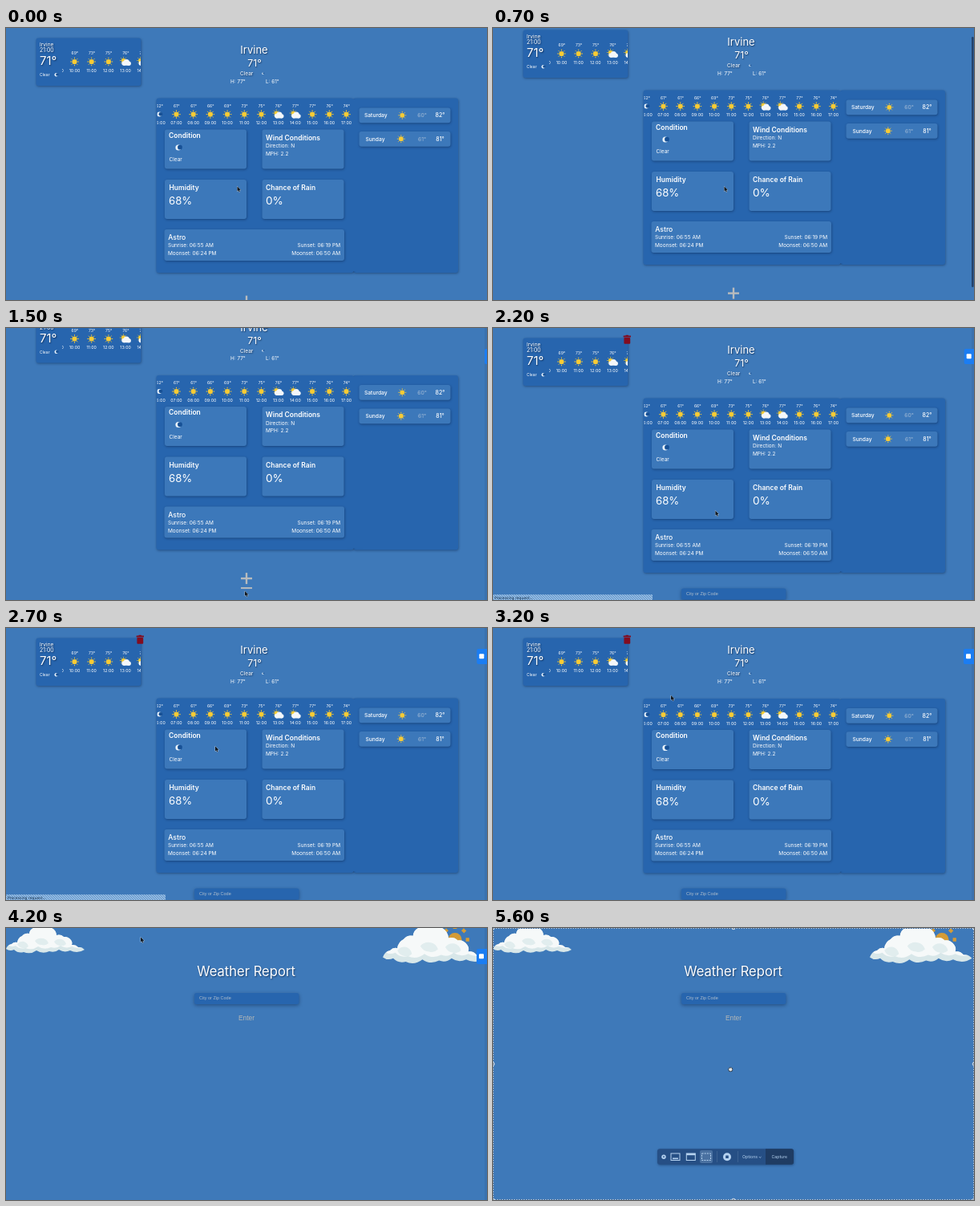
Write an HTML page with a canvas that moves like this. It is 600 px wide and 339 px high and loops after 5700 ms.

```html
<!DOCTYPE html>
<html lang="en">
<head>
<meta charset="utf-8">
<title>Weather Report</title>
<style>
html, body { margin: 0; width: 100%; height: 100%; overflow: hidden; background: #3e79b9; }
canvas { display: block; width: 600px; height: 339px; }
</style>
</head>
<body>
<canvas id="stage" width="600" height="339"></canvas>
<script>
const ctx = document.getElementById('stage').getContext('2d');
const LOOP = 5700, STEP = 100;
const SKY = '#3e79b9', PANEL = '#2765ae', CARD = '#3c78ba';
const UI = 'Inter, sans-serif', ARIAL = '"Liberation Sans", Arial, sans-serif';

// Tracks: [time, value, ...], linear between keys
const scrollTrack = [[400, 0], [700, 10], [1000, 28.5], [1700, 28.5], [2000, 0]];
const tabTrack = [[1200, 600], [1500, 597], [1800, 588], [3100, 587], [4600, 587], [4900, 600]];
const cursorTrack = [[1000, 288.5, 197.5], [1500, 298, 328], [1700, 298, 328], [2600, 261, 147.5],
  [2700, 261, 147.5], [3200, 222, 84], [4000, 168, 11.5], [4600, 168, 11.5], [5100, 296, 174]];

function at(track, t) {
  const next = track.findIndex(key => key[0] > t);
  if (next === 0) return track[0].slice(1);
  if (next < 0) return track[track.length - 1].slice(1);
  const a = track[next - 1], b = track[next], k = (t - a[0]) / (b[0] - a[0]);
  return a.slice(1).map((v, i) => v + (b[i + 1] - v) * k);
}

function shadow(alpha, x = 0, y = 0, blur = 0) {
  ctx.shadowColor = `rgba(0,20,50,${alpha})`;
  ctx.shadowOffsetX = x;
  ctx.shadowOffsetY = y;
  ctx.shadowBlur = blur;
}

function box(x, y, w, h, fill, r = 0) {
  ctx.fillStyle = fill;
  ctx.beginPath();
  ctx.roundRect(x, y, w, h, r);
  ctx.fill();
}

function raised(x, y, w, h, fill = CARD) {
  shadow(.4, .5, 1, 3);
  box(x, y, w, h, fill, 3);
  shadow(0);
}

function oval(x, y, rx, ry, fill) {
  ctx.fillStyle = fill;
  ctx.beginPath();
  ctx.ellipse(x, y, rx, ry, 0, 0, Math.PI * 2);
  ctx.fill();
}

function text(s, x, y, size, { weight = 400, align = 'left', color = '#fff', family = UI } = {}) {
  ctx.font = `${weight} ${size}px ${family}`;
  ctx.textAlign = align;
  ctx.fillStyle = color;
  ctx.fillText(s, x, y);
}

function heading(s, x, y, size, options) {
  shadow(.6, .8, 1, 1.5);
  text(s, x, y, size, options);
  shadow(0);
}

function clipped(x, y, w, h, draw) {
  ctx.save();
  ctx.beginPath();
  ctx.rect(x, y, w, h);
  ctx.clip();
  draw();
  ctx.restore();
}

function sun(x, y, r = 3.1, color = '#f8cb35', reach = 1.7, rayWidth = .32) {
  ctx.strokeStyle = color;
  ctx.lineWidth = r * rayWidth;
  ctx.beginPath();
  for (let i = 0; i < 8; i++) {
    const c = Math.cos(i * Math.PI / 4) * r, s = Math.sin(i * Math.PI / 4) * r;
    ctx.moveTo(x + c * (reach - .5), y + s * (reach - .5));
    ctx.lineTo(x + c * reach, y + s * reach);
  }
  ctx.stroke();
  oval(x, y, r, r, color);
}

function cloudySun(x, y) {
  sun(x - 2.5, y - 1.5, 2.7);
  for (const [dx, dy, r] of [[-2, 2, 2.8], [1.2, .5, 3.6], [4.2, 2.2, 2.6]]) oval(x + dx, y + dy, r, r, '#f4f7fa');
  box(x - 3, y + 2, 8, 2.8, '#f4f7fa', 1);
}

function moon(x, y, r) {
  oval(x, y, r, r, '#e9f3fb');
  oval(x + r * .55, y - r * .1, r * .8, r * .8, '#175196');
}

const hourly = [62, 61, 61, 66, 69, 73, 75, 76, 77, 77, 76, 74].map((temp, i) => ({ temp, hour: i + 6 }));

function hourStrip(x, y, hours) {
  hours.forEach(({ temp, hour }, i) => {
    const cx = x + i * 21.2;
    text(temp + '°', cx + .3, y - 8.8, 5.1, { align: 'center' });
    if (hour === 6) moon(cx, y, 3);
    else if (hour === 13 || hour === 14) cloudySun(cx, y);
    else sun(cx, y);
    text(String(hour).padStart(2, '0') + ':00', cx, y + 12.6, 5.3, { align: 'center' });
  });
}

function savedCity() {
  raised(37.5, 12.5, 131, 59.5, PANEL);
  heading('Irvine', 42, 23.2, 6.6);
  heading('21:00', 42, 30, 6.9);
  heading('71°', 42, 46, 15);
  text('Clear', 42, 60, 5);
  moon(62.7, 58.3, 2.2);
  clipped(70, 20, 98, 45, () => hourStrip(64.3, 42, hourly.slice(3, 9)));
}

function cityHeader() {
  heading('Irvine', 309.5, 32.3, 13, { align: 'center' });
  heading('71°', 310, 48.2, 12.3, { align: 'center' });
  heading('Clear', 292, 59, 6.5);
  moon(320.6, 56.7, 1.3);
  text('H: 77°', 280, 68.7, 6.4);
  text('L: 61°', 324, 68.7, 6.4);
}

function dayRow(y, name, nameX, sunX, low, high) {
  raised(440.5, y - 9.3, 114, 18.8);
  text(name, nameX, y + 2.4, 6.7, { weight: 500 });
  sun(sunX, y, 2.9);
  text(low, 519, y + 2.5, 6.8, { align: 'center', color: '#a3bbd6' });
  text(high, 541.5, y + 2.5, 7, { align: 'center', weight: 500 });
}

function details() {
  raised(433, 87.5, 131, 217.5, PANEL);
  raised(187.5, 87.5, 246, 217.5, PANEL);
  box(425, 89, 20, 214, PANEL);
  clipped(188.5, 90, 243, 34, () => hourStrip(191.3, 107.6, hourly));

  const title = (s, x, y) => text(s, x, y, 8.5, { weight: 600 });
  for (const x of [198, 319.5]) for (const y of [126.5, 189]) raised(x, y, 102, 49);
  title('Condition', 203, 136.8);
  moon(215, 149, 3.6);
  text('Clear', 203.5, 166, 6.5);
  title('Wind Conditions', 324, 139.8);
  text('Direction: N', 324, 149, 6.5);
  text('MPH: 2.2', 324, 158.6, 6.5);
  title('Humidity', 203.5, 202);
  text('68%', 203, 220.2, 13.2);
  title('Chance of Rain', 324, 202);
  text('0%', 324, 220.2, 13.6);

  raised(197.5, 251, 224.5, 39);
  text('Astro', 202.3, 264, 8.6, { weight: 500 });
  text('Sunrise: 06:55 AM', 202, 273, 6.5);
  text('Moonset: 06:24 PM', 202, 283, 6.5);
  text('Sunset: 06:19 PM', 417, 273, 6.5, { align: 'right' });
  text('Moonset: 06:50 AM', 417, 283, 6.5, { align: 'right' });

  dayRow(108.8, 'Saturday', 447, 494.3, '60°', '82°');
  dayRow(138.2, 'Sunday', 448.5, 492.8, '61°', '81°');
}

function searchField(y) {
  shadow(.4, 0, 1.5, 4);
  box(235, y, 130.5, 14, PANEL, 2.5);
  shadow(0);
  text('City or Zip Code', 241, y + 8.4, 5.5, { family: ARIAL, color: '#b3c0cd' });
}

function trash() {
  box(165.4, 8.8, 3.6, 1.4, '#820d20', .5);
  box(162.6, 9.6, 9.4, 1.9, '#820d20', .5);
  box(163.4, 12, 7.8, 7.7, '#820d20', 1);
}

function statusBar(t) {
  clipped(0, 332.3, 199, 7, () => {
    box(0, 332, 199, 7, '#6fa0d2');
    ctx.strokeStyle = '#a9c9e8';
    ctx.lineWidth = 1;
    ctx.beginPath();
    for (let x = -8 + t / 100 % 3; x < 202; x += 3) {
      ctx.moveTo(x, 332);
      ctx.lineTo(x + 7, 339);
    }
    ctx.stroke();
  });
  text('Processing request...', 2, 337.6, 4.6, { family: '"DejaVu Sans", sans-serif', color: '#16324f' });
}

function forecast(t) {
  const [scroll] = at(scrollTrack, t), editing = t >= 1800;
  ctx.save();
  ctx.translate(0, -scroll);
  savedCity();
  cityHeader();
  ctx.save();
  if (t >= 2900) ctx.translate(0, .4);
  details();
  ctx.restore();
  if (editing) {
    trash();
    searchField(324.6);
  } else {
    box(293, 339.4, 14, 2.4, '#b8bbbd');
    box(298.8, 333.6, 2.4, 14, '#b8bbbd');
    box(293, 351.6, 14, 2, '#b8bbbd');
  }
  ctx.restore();
  if (t >= 500 && t < 1200) box(597, 10 + scroll * .1, 2.6, 312, '#21436d', 1.3);
  if (t >= 2200 && t < 2800) statusBar(t);
}

// Closed outline whose edges bulge outwards between points given clockwise
function puffyPath(points, bulge = .28) {
  const path = new Path2D();
  points.forEach(([x, y], i) => {
    const [nx, ny] = points[(i + 1) % points.length];
    if (i === 0) path.moveTo(x, y);
    path.quadraticCurveTo((x + nx) / 2 + (ny - y) * bulge, (y + ny) / 2 - (nx - x) * bulge, nx, ny);
  });
  return path;
}

const cloudShape = puffyPath([[0, 26], [7, 20], [14, 18], [20, 10], [29, 7], [34, 0], [45, -3], [57, 0], [63, 9],
  [72, 11], [81, 15], [82, 21], [90, 24], [98, 27], [80, 28], [66, 27], [54, 29], [38, 28], [22, 30], [10, 27]]);
const cloudFolds = [[12, 25, 14], [34, 21, 17], [58, 22, 15]];

function cloud(x, sx, sy) {
  ctx.save();
  ctx.translate(x, 0);
  ctx.scale(sx, sy);
  ctx.fillStyle = '#d8e7e9';
  ctx.fill(cloudShape);
  ctx.clip(cloudShape);
  ctx.translate(2, -5);
  ctx.fillStyle = '#f6f9f9';
  ctx.fill(cloudShape);
  ctx.fillStyle = '#e1edee';
  for (const [fx, fy, w] of cloudFolds) ctx.fill(puffyPath([[fx, fy], [fx + w * .6, fy - 3], [fx + w, fy + 3], [fx + w * .5, fy + 5]]));
  ctx.restore();
}

function home() {
  cloud(0, 1, 1);
  sun(560, 14.5, 8.5, '#d49b36', 2.1, .55);
  cloud(470, 1.3, 1.4);
  heading('Weather Report', 299.5, 59.6, 16.6, { align: 'center' });
  searchField(81);
  text('Enter', 300, 115, 8.4, { align: 'center', family: ARIAL, color: '#b4b7b6' });
}

function captureTools() {
  const frame = (x, y, w, h, dash = []) => {
    ctx.setLineDash(dash);
    ctx.strokeRect(x, y, w, h);
    ctx.setLineDash([]);
  };
  ctx.lineWidth = 1;
  ctx.strokeStyle = '#3a6598';
  frame(.5, .5, 599, 338);
  ctx.strokeStyle = '#b4c8dc';
  frame(.5, .5, 599, 338, [1.5, 1.5]);
  for (const x of [0, 300, 600]) for (const y of [0, 169.5, 339]) {
    if (x === 300 && y === 169.5) continue;
    oval(x, y, 2.2, 2.2, '#e6edf4');
    oval(x, y, 1.4, 1.4, '#6f8aa8');
  }

  const ICON = '#b5d2f0';
  raised(205, 275.3, 170, 19.4, '#264f85');
  box(340, 275.3, 35, 19.4, '#1f3c63', [0, 3, 3, 0]);
  box(258, 277, 16, 16, '#4a71a1', 2);
  oval(213, 285.2, 2.7, 2.7, ICON);
  text('×', 213, 286.8, 4.5, { align: 'center', weight: 700, color: '#264f85' });
  ctx.strokeStyle = ICON;
  frame(222, 281, 11, 8.5);
  box(224, 286.5, 7, 1.6, ICON);
  frame(241.3, 281, 11, 8.5);
  box(241.3, 281, 11, 2.2, ICON);
  frame(260.5, 281, 11, 8.5, [2, 1.2]);
  box(279, 278, .6, 14, '#4a6d9a');
  oval(292, 285.2, 5, 5, ICON);
  box(290.2, 283.4, 3.6, 3.6, '#264f85', .5);
  box(305, 278, .6, 14, '#4a6d9a');
  text('Options', 311, 287.1, 5.2, { color: ICON });
  ctx.lineWidth = .7;
  ctx.beginPath();
  ctx.moveTo(331.8, 285);
  ctx.lineTo(333.2, 286.4);
  ctx.lineTo(334.6, 285);
  ctx.stroke();
  text('Capture', 357.3, 287.1, 5.2, { align: 'center', color: ICON });
}

function cursor(x, y) {
  ctx.beginPath();
  [[0, 0], [0, 6], [1.4, 4.8], [2.4, 7], [3.4, 6.5], [2.5, 4.4], [4.3, 4.3]].forEach(([dx, dy]) => ctx.lineTo(x + dx, y + dy));
  ctx.closePath();
  ctx.strokeStyle = '#c3d2e2';
  ctx.lineWidth = .8;
  ctx.stroke();
  ctx.fillStyle = '#101820';
  ctx.fill();
}

function hand(x, y) {
  oval(x, y + .3, 2.9, 2.9, '#35414d');
  oval(x, y + .6, 2.1, 1.8, '#e4e6e6');
  for (const dx of [-1.3, 0, 1.3]) box(x + dx - .4, y - 1.8, .8, 2.2, '#e4e6e6', .4);
}

function render(t) {
  box(0, 0, 600, 339, SKY);
  if (t < 4100) forecast(t); else home();
  const [tab] = at(tabTrack, t);
  if (tab < 600) {
    box(597, 0, 3, 339, 'rgba(20,50,90,.1)');
    box(tab, 26, 20, 19, '#1b7df2', 2);
    box(tab + 3, 32.3, 6, 6, '#fff', 1);
  }
  if (t >= 5500) {
    captureTools();
    hand(296.3, 176);
  } else cursor(...at(cursorTrack, t));
}

function tick(now) {
  render(Math.floor(now % LOOP / STEP) * STEP);
  requestAnimationFrame(tick);
}
render(0);
requestAnimationFrame(tick);
</script>
</body>
</html>
```
